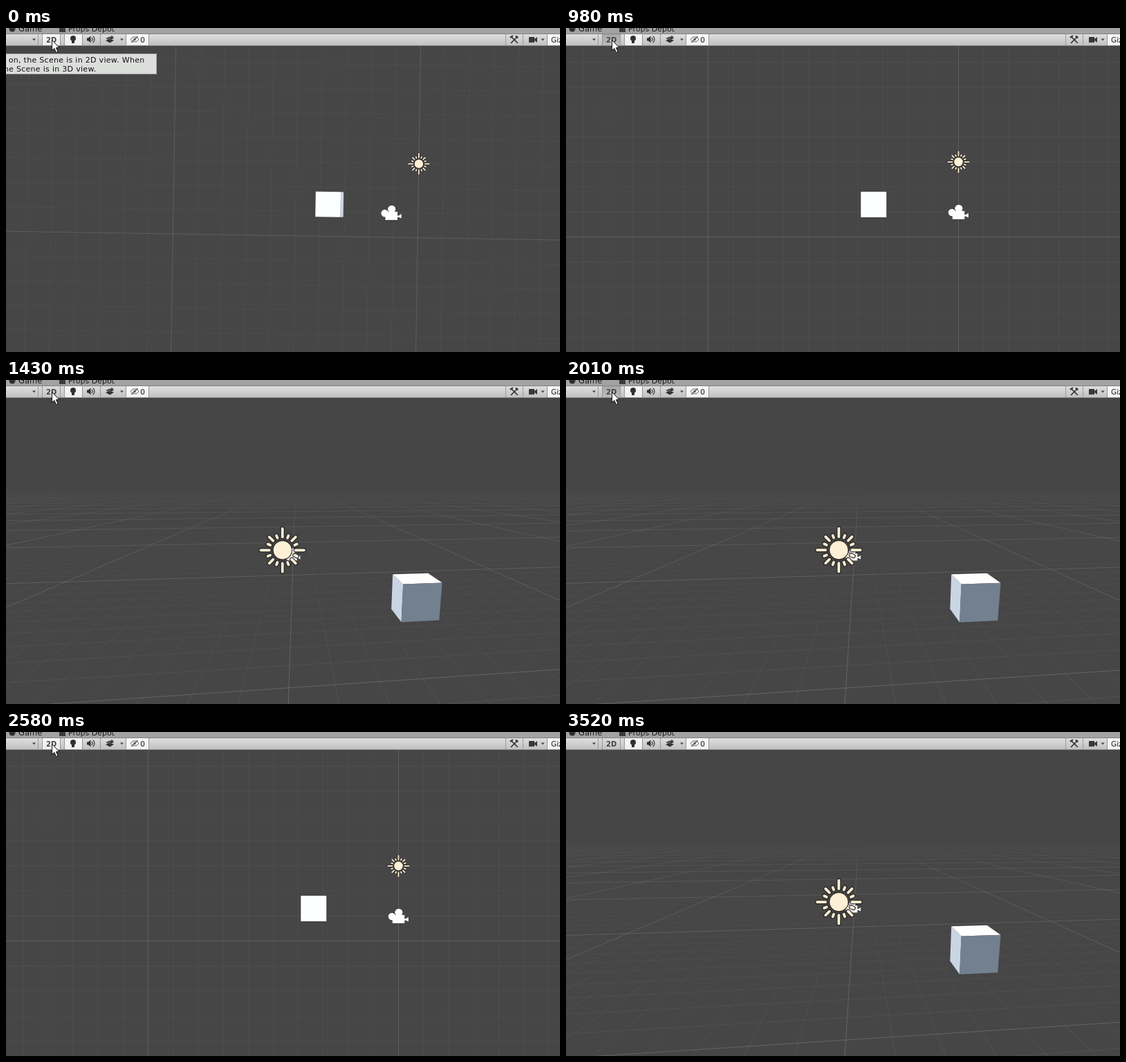
Write an HTML page with a canvas that moves like this. It is 801x469 px and loops after 4.05 s.

```html
<!DOCTYPE html>
<html lang="en">
<head>
<meta charset="utf-8">
<title>Scene view: 2D toggle</title>
<style>
  html, body { margin: 0; width: 100%; height: 100%; overflow: hidden; background: #464646; }
  canvas { display: block; }
</style>
</head>
<body>
<canvas id="stage" width="801" height="469"></canvas>
<script>
const ctx = document.getElementById('stage').getContext('2d');
const LOOP = 4050;
const STEPS = [0, 120, 270, 980, 1130, 1280, 1430, 1580, 2010, 2160, 2310, 2430,
               2580, 2980, 3100, 3250, 3400, 3520];
// Camera moves: start, duration, end (0 = flat view, 1 = perspective view)
const MOVES = [[-280, 500, 0], [1045, 500, 1], [2078, 500, 0], [2972, 560, 1]];

const CX = 489.3, CY = 299, UNIT = 36.2, DIST = 15;
const PIVOT = [-2.16, 0.097, -7.37];
const YAW = -173.1 * Math.PI / 180, PITCH = 16 * Math.PI / 180;
const LIGHT = [0, 3, 0], CAMERA = [0, 1, -10], CUBE = [-3.39, 1.298, -2];

let view;   // current camera: blend, distance, scale and axes

function blendAt(t) {
  const [start, dur, end] = MOVES.filter(m => m[0] <= t).pop();
  const p = Math.min(1, (t - start) / dur);
  const left = (1 - p) ** 4;
  return end ? 1 - left : left;
}

// Slerp from the front view to the tilted one, with the lens opening on the way
function setView(k) {
  const cy = Math.cos(YAW / 2), sy = Math.sin(YAW / 2);
  const cp = Math.cos(PITCH / 2), sp = Math.sin(PITCH / 2);
  const half = Math.acos(cy * cp), n = Math.sin(k * half) / Math.sin(half);
  const x = cy * sp * n, y = sy * cp * n, z = -sy * sp * n, w = Math.cos(k * half);
  view = {
    k,
    dist: DIST * Math.tan(0.7) / Math.tan(0.7 * Math.max(k, 1e-4)),
    unit: UNIT * Math.cos(0.284 * k),
    right: [1 - 2 * (y * y + z * z), 2 * (x * y + w * z), 2 * (x * z - w * y)],
    up: [2 * (x * y - w * z), 1 - 2 * (x * x + z * z), 2 * (y * z + w * x)],
    ahead: [2 * (x * z + w * y), 2 * (y * z - w * x), 1 - 2 * (x * x + y * y)]
  };
}

const dot = (a, b) => a[0] * b[0] + a[1] * b[1] + a[2] * b[2];

function project(p) {
  const rel = p.map((v, i) => v - PIVOT[i]);
  const depth = view.dist + dot(rel, view.ahead);
  const scale = view.unit * view.dist / depth;
  return { x: CX + dot(rel, view.right) * scale, y: CY - dot(rel, view.up) * scale, depth, scale };
}

function poly(points, fill) {
  ctx.beginPath();
  points.forEach(p => ctx.lineTo(p[0], p[1]));
  ctx.closePath();
  ctx.fillStyle = fill;
  ctx.fill();
}

function rect(x, y, w, h, fill) {
  ctx.fillStyle = fill;
  ctx.fillRect(x, y, w, h);
}

function disc(x, y, r, fill) {
  ctx.beginPath();
  ctx.arc(x, y, r, 0, 7);
  ctx.fillStyle = fill;
  ctx.fill();
}

function line(points, stroke, width) {
  ctx.beginPath();
  points.forEach(p => ctx.lineTo(p[0], p[1]));
  ctx.strokeStyle = stroke;
  ctx.lineWidth = width;
  ctx.stroke();
}

function text(str, x, y, size, fill = '#1c1c1c', align = 'left', weight = '') {
  ctx.font = `${weight} ${size}px "DejaVu Sans", Verdana, sans-serif`;
  ctx.textAlign = align;
  ctx.fillStyle = fill;
  ctx.fillText(str, x, y);
}

// ---- scene ----
const snap = v => view.k === 0 ? Math.round(v - 0.5) + 0.5 : v;

function gridLine(at, reach, step, alpha) {
  let a = project(at(-reach));
  for (let s = -reach + step; s <= reach; s += step) {
    const b = project(at(s));
    if (a.depth > 0.4 && b.depth > 0.4) {
      const o = alpha((a.depth + b.depth) / 2);
      if (o > 0.003)
        line([[snap(a.x), snap(a.y)], [snap(b.x), snap(b.y)]], `rgba(255,255,255,${o})`, 1);
    }
    a = b;
  }
}

function wallGrid() {
  if (view.k > 0.99) return;
  const o = Math.sqrt(1 - view.k);
  for (let i = -40; i <= 40; i++) {
    const alpha = d => (i % 10 ? 0.036 : 0.13) * o * Math.min(1, (view.dist / d) ** 2);
    gridLine(s => [i, s, 0], 40, 4, alpha);
    gridLine(s => [s, i, 0], 40, 4, alpha);
  }
}

function floorGrid() {
  const o = Math.min(1, Math.max(0, view.k - 0.1) * 3);
  if (!o) return;
  const pair = (i, reach, step, alpha) => {
    gridLine(s => [i, 0, s], reach, step, alpha);
    gridLine(s => [s, 0, i], reach, step, alpha);
  };
  for (let i = -60; i <= 60; i++)
    if (i % 10) pair(i, 60, 4, d => 0.1 * o * Math.exp(-d / 13));
  for (let i = -200; i <= 200; i += 10)
    pair(i, 200, 5, d => (i ? 0.17 : 0.19) * o * Math.exp(-d / 55));
}

function cube() {
  const face = (axis, sign, fill) => {
    const u = (axis + 1) % 3, v = (axis + 2) % 3;
    const pts = [[-1, -1], [1, -1], [1, 1], [-1, 1]].map(([a, b]) => {
      const p = [...CUBE];
      p[axis] += sign * 0.51;
      p[u] += a * 0.51;
      p[v] += b * 0.51;
      const s = project(p);
      return [s.x, s.y];
    });
    const [a, b, c] = pts;
    const turn = (b[0] - a[0]) * (c[1] - a[1]) - (b[1] - a[1]) * (c[0] - a[0]);
    if (turn * sign > 0.5) poly(pts, fill);
  };
  face(0, 1, '#c9d5e2');
  face(0, -1, '#8d99a8');
  face(1, 1, '#ffffff');
  face(1, -1, '#6a7480');
  face(2, 1, '#738090');
  face(2, -1, '#fcfeff');
}

function icon(pos, draw) {
  const p = project(pos), s = p.scale / UNIT;
  ctx.save();
  ctx.translate(p.x, p.y);
  ctx.scale(s, s);
  draw();
  ctx.restore();
}

function sun() {
  ctx.lineCap = 'round';
  for (const [grow, colour] of [[1.5, 'rgba(42,41,38,.8)'], [0, '#fdf0d6']]) {
    for (let i = 0; i < 16; i++) {
      const a = i * Math.PI / 8, c = Math.cos(a), s = Math.sin(a);
      const end = i % 4 === 0 ? 15 : i % 2 === 0 ? 13 : 11;
      line([[c * 9.2, s * 9.2], [c * end, s * end]], colour, 1.8 + grow);
    }
    disc(0, 0, 6.3 + grow / 2, colour);
  }
  ctx.lineCap = 'butt';
}

function movieCamera() {
  for (const [g, colour] of [[0.7, 'rgba(45,45,45,.6)'], [0, '#ffffff']]) {
    disc(-9.5, 0.8, 5.3 + g, colour);
    disc(0.4, -5, 5.6 + g, colour);
    rect(-8.8 - g, -1.5 - g, 17.6 + 2 * g, 12 + 2 * g, colour);
    poly([[8, 4 - g], [10.5, 4 - g], [14.4 + g, 1.5 - g], [14.4 + g, 8.2 + g], [10.5, 6.5 + g], [8, 6.5 + g]], colour);
  }
}

function scene() {
  rect(0, 0, 801, 469, '#464646');
  wallGrid();
  floorGrid();
  cube();
  const icons = [[LIGHT, sun], [CAMERA, movieCamera]];
  icons.sort((a, b) => project(b[0]).depth - project(a[0]).depth);
  icons.forEach(i => icon(...i));
}

// ---- toolbar ----
function shade(x, w, top, bottom) {
  const g = ctx.createLinearGradient(0, 9, 0, 25);
  g.addColorStop(0, top);
  g.addColorStop(1, bottom);
  rect(x, 9, w, 16, g);
}

const caret = x => poly([[x - 2.5, 15.5], [x + 2.5, 15.5], [x, 18.5]], '#454545');

function toolbar(button) {
  const dark = '#303030';
  rect(0, 0, 801, 9, '#a2a2a2');
  disc(9, 1, 4.5, dark);
  text('Game', 18, 5, 11.5);
  rect(77, 0, 9, 6, '#3c3c3c');
  text('Props Depot', 90, 5, 11);
  rect(0, 8, 801, 1, '#828282');
  shade(0, 801, '#dedede', '#c1c1c1');
  rect(0, 25, 801, 1, '#898989');

  const fills = { on: ['#f7f7f7', '#ededed'], off: ['#dcdcdc', '#c3c3c3'], press: ['#a9a9a9', '#bababa'] };
  shade(52, 27, ...fills[button]);
  shade(84, 26, '#f8f8f8', '#eeeeee');
  shade(173, 33, '#fafafa', '#f1f1f1');
  shade(782, 19, '#fafafa', '#f1f1f1');
  [46, 52, 78, 84, 110, 136, 173, 206, 722, 747, 782].forEach(x => rect(x, 9, 1, 16, '#969696'));

  [40.5, 167.5, 776].forEach(caret);
  text('2D', 58, 21, 10, '#444', 'left', 'bold');

  disc(97, 15, 4, dark);
  rect(95, 17, 4, 5, dark);

  poly([[117, 14.5], [119, 14.5], [122.5, 11.5], [122.5, 21.5], [119, 18.5], [117, 18.5]], dark);
  for (const r of [3, 6]) {
    ctx.beginPath();
    ctx.arc(122, 16.5, r, -0.9, 0.9);
    ctx.strokeStyle = dark;
    ctx.lineWidth = 1.2;
    ctx.stroke();
  }

  poly([[144, 18], [150, 15.5], [156, 18], [150, 21.5]], dark);
  poly([[144, 15], [150, 12.5], [156, 15], [150, 17.5]], '#505050');
  line([[153, 11], [153, 16]], dark, 1.5);
  line([[150.5, 13.5], [155.5, 13.5]], dark, 1.5);

  ctx.beginPath();
  ctx.ellipse(186, 16.5, 5.5, 3.5, 0, 0, 7);
  ctx.strokeStyle = '#666';
  ctx.lineWidth = 1;
  ctx.stroke();
  disc(186, 16.5, 1.7, '#666');
  line([[181.5, 21], [190.5, 12]], '#555', 1.2);
  text('0', 194, 21, 11);

  line([[730, 12], [740, 22]], dark, 1.6);
  line([[740, 12], [730, 22]], dark, 1.6);
  line([[729, 14], [733, 11]], dark, 2);
  line([[737, 11.5], [740, 14.5]], dark, 2.2);

  rect(756, 13, 8, 8, '#383838');
  poly([[764, 16], [768, 13], [768, 21], [764, 18]], '#383838');
  text('Gizmos', 788, 21, 10.5);
}

function tooltip() {
  rect(-1, 37, 219, 30, '#a9aba9');
  rect(-1, 38, 218, 28, '#dcdedc');
  ctx.letterSpacing = '0.3px';
  text('button on, the Scene is in 2D view. When', 200.5, 50, 11, '#111', 'right');
  text('off, the Scene is in 3D view.', 130.5, 63, 11, '#111', 'right');
  ctx.letterSpacing = '0px';
}

function cursor(x, y) {
  const shape = [[0, 0], [0, 15], [3.5, 12], [6, 18], [8.5, 17], [6, 11], [10.5, 11]]
    .map(p => [x + p[0], y + p[1]]);
  poly(shape, '#fff');
  line([...shape, shape[0]], '#111', 1);
}

function draw(t) {
  setView(blendAt(t));
  if (view.k < 1e-5) setView(0);
  scene();
  const button = t < 980 ? 'on' : t < 1130 ? 'press' : t < 2010 ? 'off'
    : t < 2160 ? 'press' : t < 2980 ? 'on' : 'off';
  toolbar(button);
  if (t < 980) tooltip();
  if (t < 3250) cursor(t < 2980 ? 66.5 : 65.5, 17.5);
}

let shown = -1;
const began = performance.now();
function tick() {
  const t = (performance.now() - began) % LOOP;
  const step = STEPS.filter(s => s <= t).pop();
  if (step !== shown) draw(shown = step);
  requestAnimationFrame(tick);
}
tick();
</script>
</body>
</html>
```
